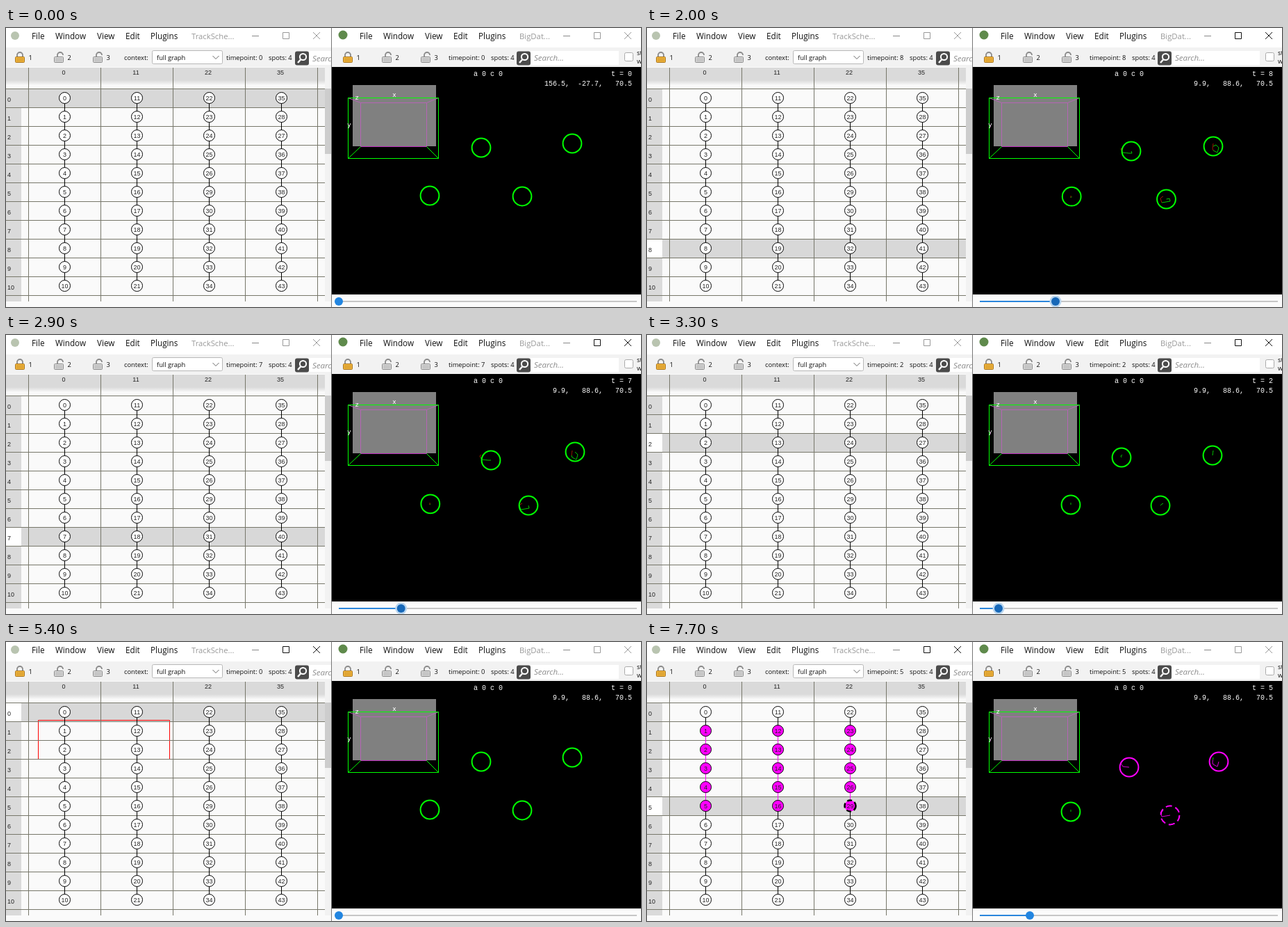
These frames come from a looping animation (914x401 px, 8000 ms). An HTML page:

```html
<!DOCTYPE html>
<html lang="en">
<head>
<meta charset="utf-8">
<title>Linked track views</title>
<style>
  html, body { margin: 0; width: 914px; height: 401px; overflow: hidden; background: #fff; }
  svg { display: block; }
  text { white-space: pre; }
  .ui { font-family: "Open Sans", "Noto Sans", sans-serif; font-size: 9.3px; fill: #111; }
  .menu { font-size: 11.7px; }
  .title { font-size: 11.3px; fill: #999; }
  .hint { font-size: 11.5px; font-style: italic; fill: #8c8c8c; }
  .num { font: 9px "Liberation Sans", Arial, sans-serif; fill: #222; }
  .mono { font: 10px "Liberation Mono", monospace; fill: #fff; }
  .axis { font: 9px "DejaVu Sans", sans-serif; fill: #fff; }
</style>
</head>
<body>
<svg id="stage" width="914" height="401" viewBox="0 0 914 401"></svg>
<script>
const LOOP = 8000, STEP = 100;
const GREEN = '#00ff00', PINK = '#ff00ff', GRID = '#77776a';
const COL_X = [84, 188, 292, 396], ROW_Y = 100, ROW_H = 27, ROWS = 11;

// Keyframes: [key, value, value...]
const SLIDER = [[1200, 479], [1300, 487], [1500, 503], [2100, 605], [2200, 611], [2400, 615],
  [2600, 615], [2700, 600], [3300, 506], [3700, 479]];
const POINTER = [[0, 156.5, -27.7], [600, 9.9, 88.6]];
const BAND = [[5100, 60, 118], [5400, 236, 169], [5800, 262, 196], [5900, 262, 196], [6800, 316, 243]];
const SPOTS = [
  [[0, 610, 241], [2, 610, 244], [5, 610, 244], [10, 612, 241]],
  [[0, 684, 172], [1, 682, 174], [2, 683, 176], [3, 685, 179], [5, 694, 180], [7, 698, 180], [8, 697, 177], [10, 690, 175]],
  [[0, 815, 166], [2, 814, 173], [3, 815, 176], [4, 821, 179], [5, 823, 172], [7, 819, 168], [8, 815, 170], [10, 816, 171]],
  [[0, 743, 242], [1, 741, 243], [2, 739, 245], [3, 741, 251], [5, 753, 249], [7, 752, 245], [9, 743, 247], [10, 742, 245]]
];

function sample(keys, k) {
  if (k <= keys[0][0]) return keys[0].slice(1);
  for (let i = 1; i < keys.length; i++) {
    const a = keys[i - 1], b = keys[i];
    if (k <= b[0]) {
      const f = (k - a[0]) / (b[0] - a[0]);
      return a.slice(1).map((v, j) => v + (b[j + 1] - v) * f);
    }
  }
  return keys[keys.length - 1].slice(1);
}

const rect = (x, y, w, h, fill, extra = '') =>
  `<rect x="${x}" y="${y}" width="${w}" height="${h}" fill="${fill}" ${extra}/>`;
const path = (d, stroke, width = 1, extra = '') =>
  `<path d="${d}" fill="none" stroke="${stroke}" stroke-width="${width}" ${extra}/>`;
const circle = (x, y, r, fill, extra = '') =>
  `<circle cx="${x}" cy="${y}" r="${r}" fill="${fill}" ${extra}/>`;
const text = (x, y, s, cls, extra = '') =>
  `<text x="${x}" y="${y}" class="${cls}" ${extra}>${s}</text>`;
const middle = 'text-anchor="middle"', end = 'text-anchor="end"';

function nodeLabel(col, row) {
  if (col === 2) return 22 + row + (row > 4 ? 2 : 0);
  if (col === 3) return row === 1 ? 28 : row === 2 ? 27 : row ? 33 + row : 35;
  return col * 11 + row;
}

function titleBar(x, name, active) {
  const ink = active ? '#111' : '#999';
  const menus = [['File', 37], ['Window', 71], ['View', 131], ['Edit', 172], ['Plugins', 208]];
  return menus.map(([s, dx]) => text(x + dx, 15.5, s, 'ui menu')).join('') +
    text(x + 267, 15.5, name, 'ui title');
}

function windowButtons(x, active) {
  const ink = active ? '#111' : '#999';
  return path(`M${x} 11.5h10`, '#888') +
    path(`M${x + 44.5} 6.5h9v9h-9z`, ink) +
    path(`M${x + 88} 6l10 10m0 -10l-10 10`, ink);
}

function lock(x, label, on) {
  const body = on ? '#f2b63c' : '#d8d8d8', edge = on ? '#a87420' : '#8c8c8c';
  const dx = on ? 0 : 2;
  return path(`M${x - 4 + dx} 42v-3a4 4 0 0 1 8 0${on ? 'v3' : ''}`, '#8a8a8a', 1.8) +
    rect(x - 6.5, 41.5, 13, 8, body, `rx="1" stroke="${edge}"`) +
    path(`M${x - 5} 44.5h10m-10 2.5h10`, edge, .6) +
    text(x + 12.5, 45.5, label, 'ui');
}

function searchBox(x, width, baseline) {
  return rect(x + 20, 33, width, 20, '#fff') +
    rect(x, 33.5, 20, 20, '#4b4b4b', 'rx="3"') +
    circle(x + 11.5, 41.5, 4.6, 'none', 'stroke="#fff" stroke-width="2"') +
    path(`M${x + 8} 45.5l-4 4.5`, '#fff', 2.4) +
    text(x + 25, baseline, 'Search...', 'ui hint');
}

function toolbars(t) {
  const shift = t > 9 ? 5 : 0;
  const locks = x => lock(x, 1, true) + lock(x + 56, 2, false) + lock(x + 112, 3, false);
  const status = x => text(x, 45.5, `timepoint: ${t}`, 'ui') + text(x + 61 + shift, 45.5, 'spots: 4', 'ui');
  return '<g clip-path="url(#left)">' + locks(20) + text(170, 45.5, 'context:', 'ui') +
    rect(210.5, 32.5, 101, 19, '#fff', 'stroke="#b8b8b8" rx="2"') +
    text(217, 45.5, 'full graph', 'ui') + path('M297.500 40l4.500 4.500l4.500 -4.500', '#666') +
    status(317) + searchBox(416 + shift, 60, 47.5) + '</g>' +
    locks(492) + status(637) + searchBox(735 + shift, 127, 46.5) +
    rect(890.5 + shift, 35.5, 12, 12, '#fff', 'stroke="#aaa" rx="2"') +
    text(908 + shift, 39, 'st', 'ui') + text(908 + shift, 51, 'w', 'ui');
}

function graph(ms, t, picked) {
  const top = 87 + t * ROW_H;
  const focused = ms >= 7200;
  let s = rect(0, 56, 459, 337, '#fafafa') + rect(0, 87, 22, 306, '#dadada') +
    rect(0, 57, 459, 30, 'url(#head)') +
    rect(22, top, 437, ROW_H, '#d8d8d8') +
    rect(0, top, 22, ROW_H, ms < 1300 ? '#d8d8d8' : '#fff');
  if (ms >= 5100 && ms < 7100) {
    const [x, y] = sample(BAND, ms).map(Math.round);
    s += path(`M46.500 112.500H${x - .5}V${y - .5}H46.500z`, '#ff0000');
  }
  for (let i = 0; i < 5; i++) s += path(`M${32.5 + i * 104} 57V393`, GRID);
  for (let i = 0; i <= ROWS; i++) s += path(`M0 ${87.5 + i * ROW_H}H459`, GRID);
  for (let r = 0; r < ROWS; r++) s += text(2, ROW_Y + 6 + r * ROW_H, r, 'num');
  COL_X.forEach((x, col) => {
    s += text(x - 1, 67, [0, 11, 22, 35][col], 'num', middle);
    s += path(`M${x + .5} ${ROW_Y}v270`, '#000');
    const chosen = row => picked && col < 3 && row > 0 && row < 6;
    if (picked && col < 3) s += path(`M${x + .5} 127v108`, PINK);
    for (let row = 0; row < ROWS; row++) {
      const y = ROW_Y + .5 + row * ROW_H;
      const hover = ms === 7600 && col === 1 && row === 8;
      const focus = focused && col === 2 && row === 5;
      const stroke = hover ? 'stroke-width="3"' : focus ? 'stroke-width="2.5" stroke-dasharray="7 4"' : '';
      s += circle(x + .5, y, hover ? 12 : 8, chosen(row) ? PINK : '#fff', `stroke="#000" ${stroke}`) +
        text(x + .5, y + 3, nodeLabel(col, row), 'num', middle);
    }
  });
  return s + rect(459, 56, 9, 345, '#f2f2f2') + rect(459, 87, 9, 94, '#cdcdcd') +
    rect(0, 393, 468, 8, '#fafafa');
}

function volumeBox() {
  return rect(499, 82, 120, 88, '#808080') +
    path('M510.500 107.500H605.500V170.500H510.500zM492.500 100.500l18 7M622.500 100.500l-17 7', '#b565b5') +
    path('M510.500 170.500H605.500', '#c02cc0') +
    path('M492.500 100.500H622.500V187.500H492.500zl0 87l18 -17M622.500 187.500l-17 -17', GREEN) +
    text(559, 99, 'x', 'axis', middle) + text(505, 103, 'z', 'axis', middle) +
    text(494, 142, 'y', 'axis', middle);
}

function spots(t, picked) {
  return SPOTS.map((keys, i) => {
    const pink = picked && i > 0 && t > 0 && t < 6;
    const [x, y] = sample(keys, t);
    let s = '';
    for (let k = 1; k <= t; k++) {
      const a = sample(keys, k - 1), b = sample(keys, k);
      const hue = pink && k > 1 ? '#d800d8' : t - k > 4 ? '#a01800' : '#00c800';
      s += path(`M${a}L${b}`, hue);
    }
    const dash = pink && i === 3 ? 'stroke-dasharray="9 5.100"' : '';
    return s + circle(x, y, 13.4, 'none', `stroke="${pink ? PINK : GREEN}" stroke-width="2" ${dash}`);
  }).join('');
}

function viewer(ms, t, picked) {
  const pos = [...sample(POINTER, ms), 70.5].map(v => v.toFixed(1).padStart(6)).join(', ');
  return rect(469, 56, 445, 327, '#000') + volumeBox() + spots(t, picked) +
    text(673, 69, 'a 0 c 0', 'mono') + text(901, 69, `t = ${t}`, 'mono', end) +
    text(901, 83, pos.trim(), 'mono', end);
}

function slider(ms, x) {
  const hover = ms >= 800 && ms < 4100, drag = ms >= 1300 && ms < 3700;
  return rect(469, 383, 445, 18, '#fbfbfb') +
    path('M479 393H908', '#c6c6c6', 2) + path(`M479 393H${x}`, '#2a86dc', 2) +
    (drag ? circle(x, 393, 8.5, '#b9d6f0') : '') +
    circle(x, 393, 6, hover ? '#1768b8' : '#2285e0');
}

function draw(time) {
  const ms = Math.floor(time / STEP) * STEP;
  const jumped = ms >= 7200, picked = ms >= 7100;
  const knob = jumped ? 551 : sample(SLIDER, ms)[0];
  const t = jumped ? 5 : Math.round((knob - 479) / 13.68);
  const leftActive = ms >= 5100, rightActive = ms >= 1100 && ms < 5100;
  stage.innerHTML = `<defs>
    <clipPath id="left"><rect width="468" height="401"/></clipPath>
    <linearGradient id="head" x2="0" y2="1"><stop offset=".6" stop-color="#dadada"/>
    <stop offset=".85" stop-color="#fafafa"/></linearGradient></defs>` +
    rect(0, 0, 914, 401, '#fff') + rect(0, 28, 914, 28, '#f2f2f2') +
    circle(13, 11, 6, '#b9c4b0') + circle(485, 10, 6.5, '#5f8a4c') +
    titleBar(0, 'TrackSche...') + titleBar(472, 'BigDat...') +
    windowButtons(354, leftActive) + windowButtons(802, rightActive) +
    toolbars(t) + graph(ms, t, picked) + viewer(ms, t, picked) + slider(ms, knob) +
    rect(468, 0, 1, 401, '#777');
}

const stage = document.getElementById('stage');
const start = performance.now();
function tick() {
  draw((performance.now() - start) % LOOP);
  requestAnimationFrame(tick);
}
tick();
</script>
</body>
</html>
```
